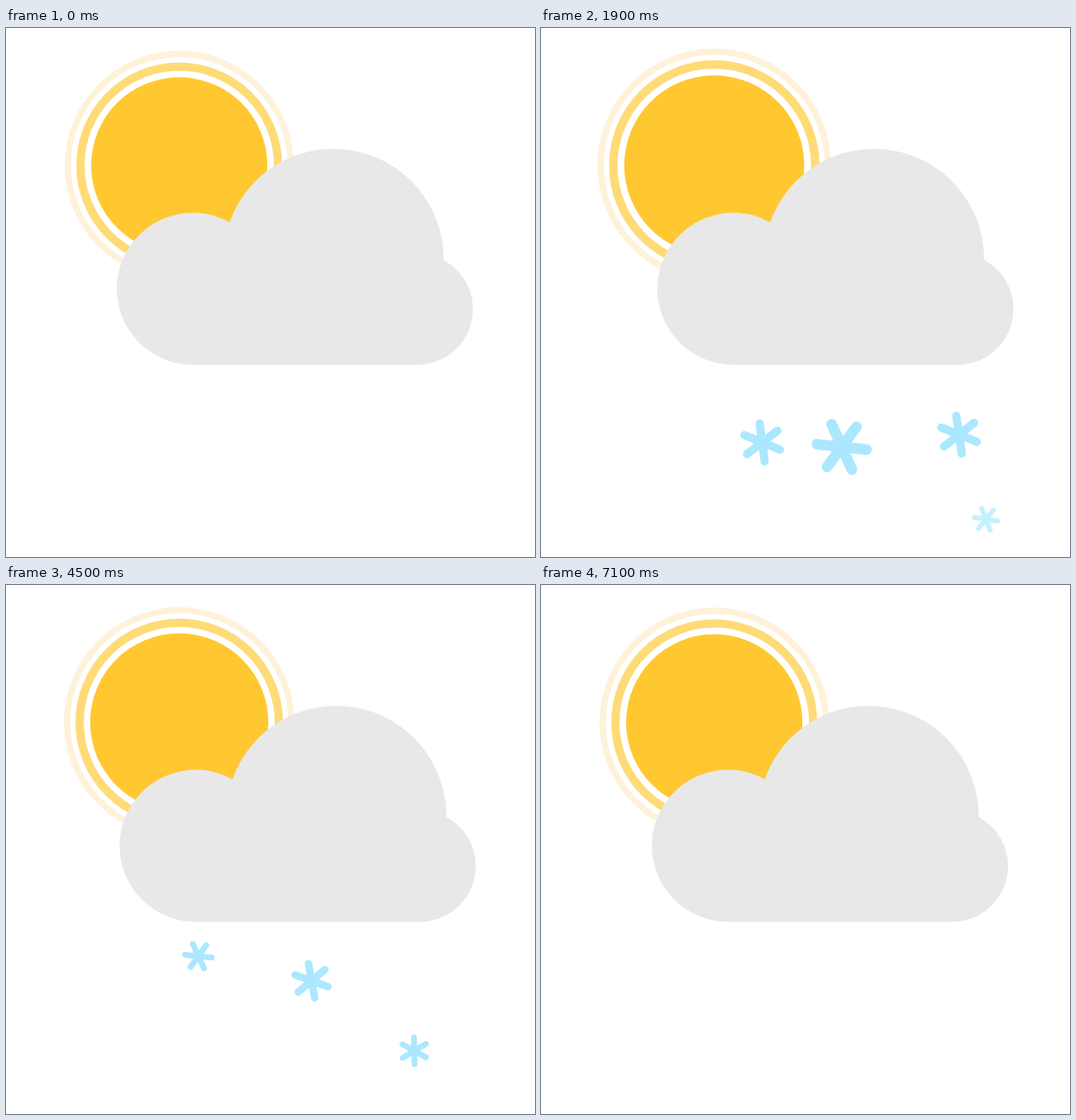
Animation, 640 px wide and 640 px high, one loop 7.2 s. Source, as an HTML page:

```html
<!DOCTYPE html>
<html lang="en">
<head>
<meta charset="utf-8">
<title>Sun, cloud and snow</title>
<style>
  html, body { margin: 0; width: 100%; height: 100%; overflow: hidden; background: #fff; }
  svg { display: block; width: 100%; height: 100%; }
</style>
</head>
<body>
<svg viewBox="0 0 640 640">
  <defs>
    <path id="flake" d="M0-30V30M-26-15L26 15M-26 15L26-15"
      fill="none" stroke="#abe8ff" stroke-width="13" stroke-linecap="round"/>
  </defs>
  <g id="sun" transform="translate(209.6 166.2)">
    <circle r="134.8" fill="none" stroke="#fff2da" stroke-width="7.6"/>
    <circle r="119.5" fill="none" stroke="#ffdb77" stroke-width="10"/>
    <circle r="106.6" fill="#ffc830"/>
  </g>
  <g id="snow"></g>
  <path id="cloud" fill="#e8e8e8" d="M226 407.5A92 92 0 1 1 270.5 235A133.2 133.2 0 0 1 529.3 280.7A67.4 67.4 0 0 1 497.5 407.5Z"/>
</svg>
<script>
const LOOP = 7200, CYCLE = LOOP / 2;
const LIFE = 3150, FADE = 500, FALL = 160;

const $ = id => document.getElementById(id);
const clamp = v => Math.max(0, Math.min(1, v));
const lerp = (a, b, u) => a + (b - a) * u;
const ease = u => lerp(u * u * (3 - 2 * u), u, 0.2);

// Rises until the peak, then returns to zero by the end of the cycle.
const swell = (t, peak) => ease(t < peak ? t / peak : (CYCLE - t) / (CYCLE - peak));

// Flakes of a lane share one curve: drift sideways, bend back, and spin.
const lanes = [
  { x: 160, y: 387, drift: 232, bend: -114, tilt: -44, spin: 51,
    drops: [{ start: -350, size: 0.77 }, { start: 3280, size: 0.54 }] },
  { x: 397, y: 428, drift: -120, bend: 107, tilt: 15, spin: -79,
    drops: [{ start: 350, size: 1 }, { start: 3500, size: 0.7 }] },
  { x: 508, y: 451, drift: -115, bend: 135, tilt: 12, spin: -104,
    drops: [{ start: -920, size: 0.47, dx: 25 }, { start: 1290, size: 0.77, dx: 15, dy: 10 },
      { start: 2285, size: 0.54 }] }
];

const flakes = lanes.flatMap(lane => lane.drops.map(drop => {
  const el = document.createElementNS('http://www.w3.org/2000/svg', 'use');
  el.setAttribute('href', '#flake');
  $('snow').append(el);
  return { el, dx: 0, dy: 0, ...lane, ...drop };
}));

function drawFlake(f, t) {
  const age = t - f.start, u = clamp(age / LIFE);
  const x = f.x + f.dx + f.drift * u + f.bend * u * u;
  const y = f.y + f.dy + FALL * u;
  f.el.setAttribute('opacity', clamp(Math.min(t, age, LIFE - age) / FADE));
  f.el.setAttribute('transform',
    `translate(${x} ${y}) rotate(${f.tilt + f.spin * u}) scale(${f.size})`);
}

function draw(t) {
  const c = t % CYCLE;
  // The pulse travels from the disc outwards.
  [...$('sun').children].reverse().forEach((ring, i) => {
    const grow = 1 + (0.022 + 0.003 * i) * swell(c, CYCLE / 2 + 550 * i);
    ring.setAttribute('transform', `scale(${grow})`);
  });
  $('cloud').setAttribute('transform', `translate(${6.9 * swell(c, CYCLE / 2)} 0)`);
  flakes.forEach(f => drawFlake(f, t));
}

const start = performance.now();
function tick() {
  draw((performance.now() - start) % LOOP);
  requestAnimationFrame(tick);
}
draw(0);
requestAnimationFrame(tick);
</script>
</body>
</html>
```
